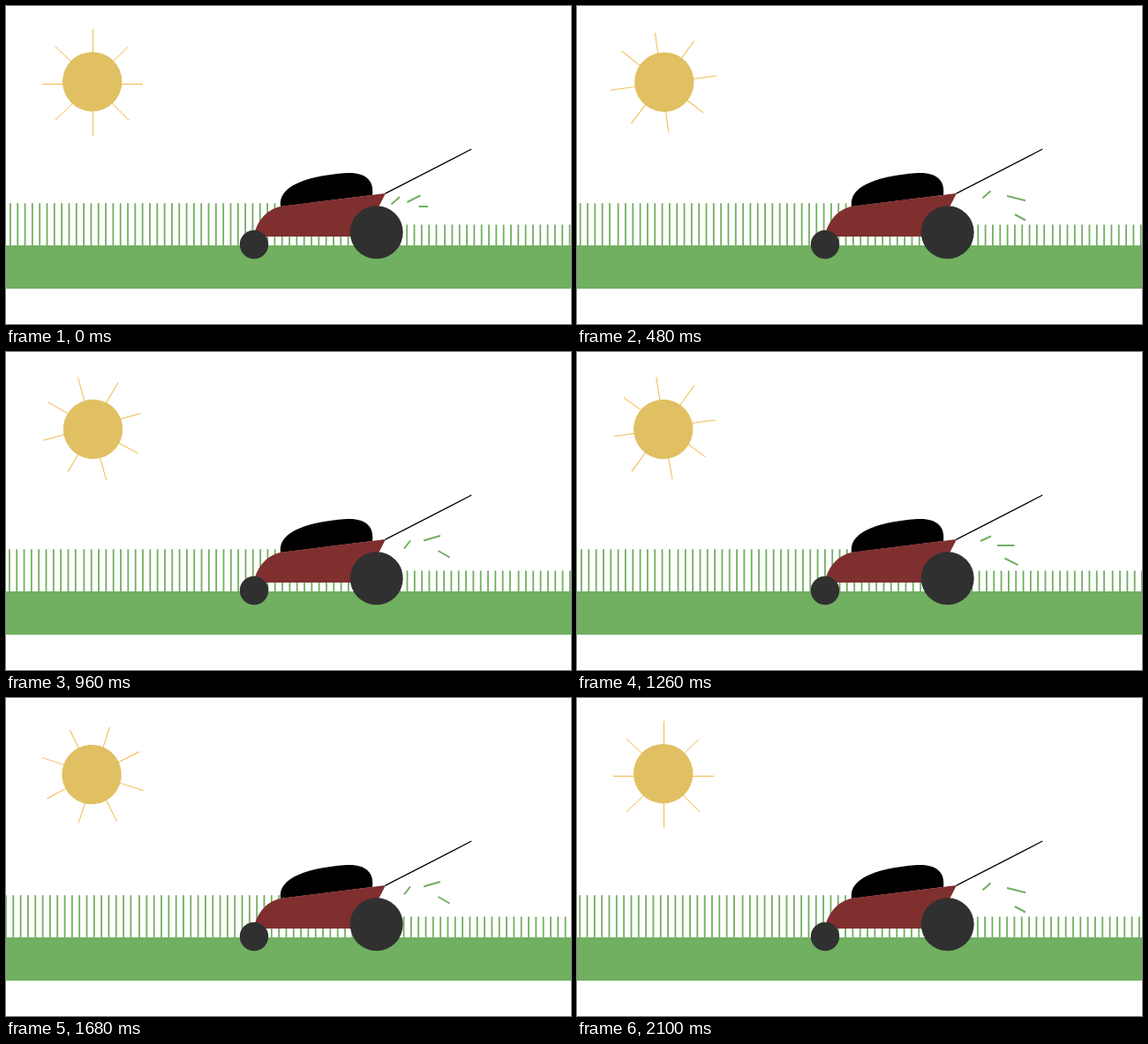
Animation of 640 by 360 pixels, one loop 2160 ms. Source, as an HTML page:

```html
<!DOCTYPE html>
<html lang="en">
<head>
<meta charset="utf-8">
<title>Lawn mower</title>
<style>
  html, body { margin: 0; width: 100%; height: 100%; overflow: hidden; background: #fff; }
  svg { display: block; width: 100vw; height: 100vh; }
</style>
</head>
<body>
<svg viewBox="0 0 640 360">
  <g id="sun">
    <path stroke="#f0bb4a" d="M.5-60.6V-30M.5 30V60.4M-57 1.9H-30M30 1.9H57M-42-40.6L-22-21.6M40-40L21-21.6M41 42.4L21 22.4M-42 42.4L-21 22.4"/>
    <circle cx="-.3" cy="-.9" r="33.7" fill="#e0c062"/>
  </g>
  <g fill="none" stroke="#71af61" stroke-width="2">
    <path id="grass" stroke-width="1.8"/>
    <path id="clippings"/>
  </g>
  <path fill="#71af61" d="M0 271H640V320H0Z"/>
  <path d="M311 227C308 207 332 193 386 189C407 188 417 197 415 214Z"/>
  <path fill="#802f2f" d="M280 261Q288 231 313 226.5L430 212L405 261Z"/>
  <path stroke="#000" stroke-width="1.3" d="M429.5 212.3L527.3 162"/>
  <g fill="#303030">
    <circle cx="281" cy="270" r="16.2"/>
    <circle cx="419.7" cy="256.3" r="30"/>
  </g>
</svg>
<script>
const STEP = 60, STEPS = 36;
const $ = id => document.getElementById(id);

const clippings = [
  "M436.5 224.5L446 216M454.5 222L469.5 214.5M467.5 227H478",
  "M451 222.5L458 213.5M473 213.5L492 208M489.5 225L502.5 232.5",
  "M459.5 217.5L468.5 209.5M487 215L508 220.2M496 236L508 242.5",
  "M457 214L469 208.5M476 219H495.5M484.5 233.5L499.5 241.2"
];

// Tufts of 59 blades follow each other, with a wider gap between tufts.
function grass(shift) {
  const blades = 59, gap = 8.32, tuft = 492.2;
  let d = "";
  for (let start = shift - tuft; start < 640; start += tuft)
    for (let i = 0; i < blades; i++) {
      const x = start + i * gap;
      if (x > -2 && x < 642) d += `M${x.toFixed(2)} ${x < 350 ? 223.3 : 247.5}V272`;
    }
  return d;
}

function draw(now) {
  const n = Math.floor(now / STEP) % STEPS;
  $("sun").setAttribute("transform", `translate(98 86.6) rotate(${n * 360 / 35})`);
  $("grass").setAttribute("d", grass(4.9 + 5.22 * n));
  $("clippings").setAttribute("d", clippings[n ? 1 + (n - 1) % 3 : 0]);
}

const begin = performance.now();
function tick() {
  draw(performance.now() - begin);
  requestAnimationFrame(tick);
}
tick();
</script>
</body>
</html>
```
